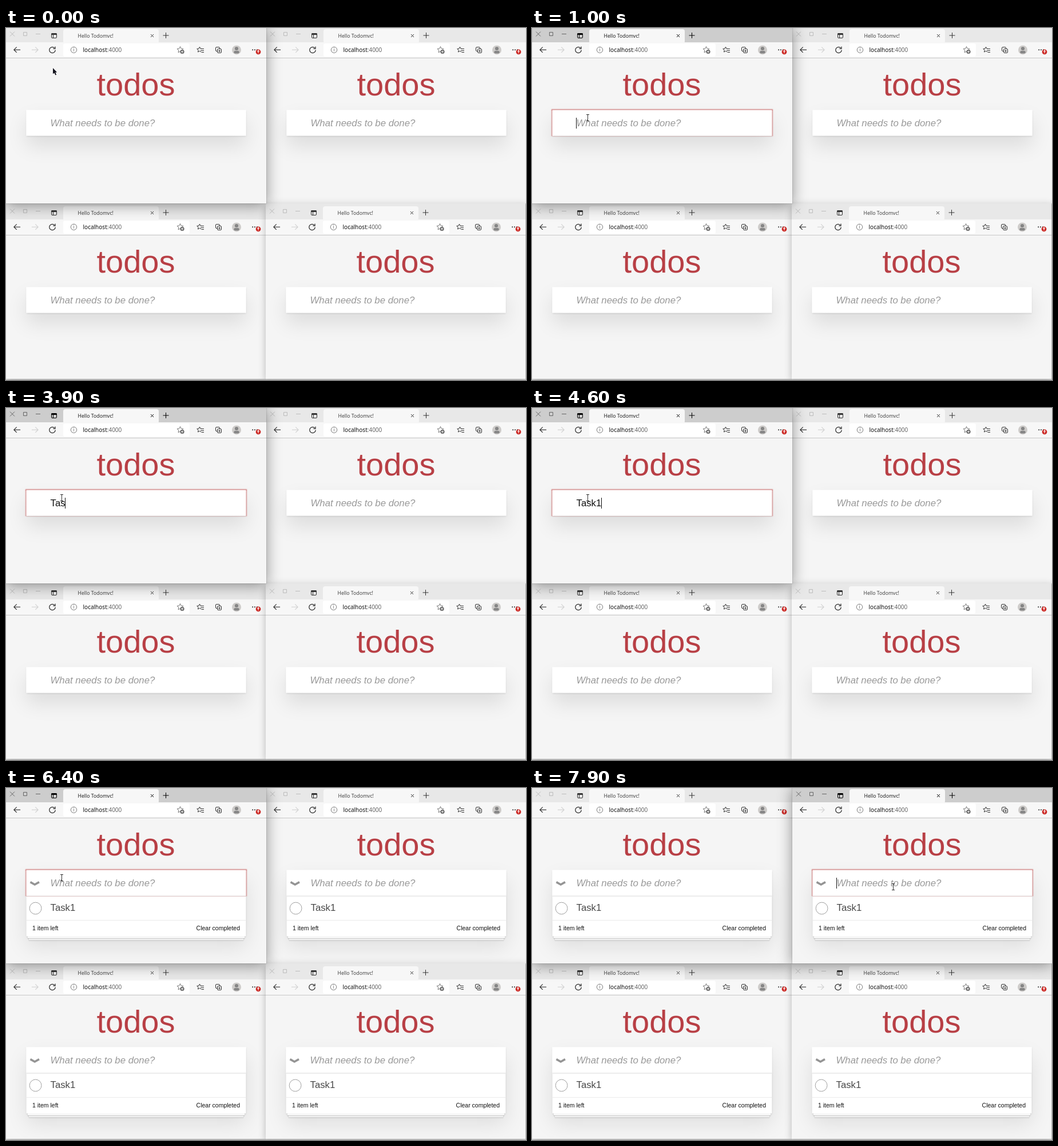
Write an HTML page with a canvas that moves like this. It is 909x616 px and loops after 8 s.

```html
<!DOCTYPE html>
<html lang="en">
<head>
<meta charset="utf-8">
<title>Todos</title>
<style>
html, body { margin: 0; width: 100%; height: 100%; overflow: hidden; background: #dcdcdc; }
canvas { display: block; width: 909px; height: 616px; }
</style>
</head>
<body>
<canvas id="stage" width="909" height="616"></canvas>
<script>
const LOOP = 8000, STEP = 100, BLINK = 600;
const FOCUS = 1000, MISSPELT = 5600, SUBMIT = 6400, SWITCH = 7900;
const WORD = 'Task1', TYPED_AT = [2800, 3800, 3900, 4500, 4600];

const ZOOM = 0.7; // page zoom: page sizes below are CSS pixels times this
const SANS = '"Liberation Sans", Arial, sans-serif';
const UI = '"Noto Sans", "Open Sans", sans-serif';
const BIG = 24 * ZOOM + 'px ' + SANS, SMALL = 15 * ZOOM + 'px ' + SANS;
const LEFT = 35.5, TOP = 143.5, WIDTH = 384, FIELD = 45.5, FULL = 116;
const TEXT_X = LEFT + 60 * ZOOM;
const ctx = document.getElementById('stage').getContext('2d');

function rect(x, y, w, h, color) {
  ctx.fillStyle = color;
  ctx.fillRect(x, y, w, h);
}

function round(x, y, w, h, r, color) {
  ctx.fillStyle = color;
  ctx.beginPath();
  ctx.roundRect(x, y, w, h, r);
  ctx.fill();
}

function frame(x, y, w, h, r, color) {
  ctx.strokeStyle = color;
  ctx.lineWidth = 1;
  ctx.beginPath();
  ctx.roundRect(x, y, w, h, r);
  ctx.stroke();
}

function disc(x, y, r, color) {
  ctx.fillStyle = color;
  ctx.beginPath();
  ctx.arc(x, y, r, 0, 7);
  ctx.fill();
}

function ring(x, y, r, color, width = 1, to = 2 * Math.PI) {
  ctx.strokeStyle = color;
  ctx.lineWidth = width;
  ctx.beginPath();
  ctx.arc(x, y, r, 0, to);
  ctx.stroke();
}

function line(color, width, ...points) {
  ctx.strokeStyle = color;
  ctx.lineWidth = width;
  ctx.beginPath();
  for (const [x, y] of points) ctx.lineTo(x, y);
  ctx.stroke();
}

function plus(x, y, r, color) {
  line(color, 1, [x - r, y], [x + r, y]);
  line(color, 1, [x, y - r], [x, y + r]);
}

function cross(x, y, r, color) {
  line(color, 1, [x - r, y - r], [x + r, y + r]);
  line(color, 1, [x + r, y - r], [x - r, y + r]);
}

// Arrow pointing right, turned by the angle
function arrow(x, y, r, angle, color, head = r * 0.85) {
  ctx.save();
  ctx.translate(x, y);
  ctx.rotate(angle);
  line(color, 1.1, [-r, 0], [r, 0]);
  line(color, 1.1, [r - head, -head], [r, 0], [r - head, head]);
  ctx.restore();
}

function star(x, y, r, color) {
  const points = Array.from({ length: 11 }, (_, i) => {
    const a = i * Math.PI / 5 - Math.PI / 2, d = i % 2 ? r * 0.48 : r;
    return [x + d * Math.cos(a), y + d * Math.sin(a)];
  });
  line(color, 1, ...points);
}

function text(str, x, y, font, color, align = 'left') {
  ctx.font = font;
  ctx.fillStyle = color;
  ctx.textAlign = align;
  ctx.fillText(str, x, y);
  return ctx.measureText(str).width;
}

// Shadow alone: the casting box stays off stage
function shadow(x, y, w, h, dy, blur, spread, color) {
  ctx.save();
  ctx.shadowColor = color;
  ctx.shadowBlur = blur;
  ctx.shadowOffsetX = 3000;
  ctx.shadowOffsetY = dy;
  rect(x - spread - 3000, y - spread, w + 2 * spread, h + 2 * spread, '#000');
  ctx.restore();
}

function titleBar(w, active) {
  const dim = active ? '#666' : '#bcbcbc', ink = active ? '#000' : '#333';
  rect(0, -3, w, 28, active ? '#cdcdcd' : '#e8e8e8');
  cross(11, 10.5, 4, dim);
  frame(30.5, 7.5, 6, 6, 0, dim);
  line(dim, 1, [52, 10.5], [60, 10.5]);
  frame(79.5, 9.5, 9, 8, 1.5, ink);
  rect(79.5, 9, 9, 3, ink);
  line(ink, 1, [82.5, 12], [82.5, 18]);
  round(100, 2, 167, 25, 4, '#f7f7f7');
  text('Hello Todomvc!', 125.5, 16.5, '8.7px ' + UI, active ? '#222' : '#444');
  cross(255.5, 13.5, 2.5, ink);
  plus(279.5, 13, 5, ink);
}

function addressBox() {
  round(100, 27, 221, 23, 3, '#fff');
  ring(118.5, 38.3, 5.2, '#777');
  text('i', 118.5, 41.3, '8px ' + UI, '#666', 'center');
  const font = '10px ' + UI, w = text('localhost', 134.5, 42, font, '#111');
  text(':4000', 134.5 + w, 42, font, '#666');
  star(304.5, 38.2, 5.8, '#777');
  disc(308, 41.5, 3.6, '#666');
  plus(308, 41.5, 2, '#fff');
}

function toolBar(w) {
  rect(0, 25, w, 27, '#f7f7f7');
  rect(0, 52, w, 1, '#c8c8c8');
  arrow(19.5, 38.2, 5.6, Math.PI, '#222');
  arrow(50.5, 38.2, 5.6, 0, '#cfcfcf');
  ring(81, 38.5, 5.2, '#222', 1.2, 5.5);
  line('#222', 1.2, [86, 32.6], [86, 36.2], [82.4, 36.2]);
  addressBox();

  star(338.5, 38, 5, '#333');
  rect(340.8, 35.5, 6, 8, '#f7f7f7');
  for (let i = 0; i < 3; i++) line('#333', 1, [340.5 + i / 2, 36.5 + 3 * i], [346, 36.5 + 3 * i]);
  frame(366.5, 33.5, 7, 7, 1.5, '#333');
  rect(369.5, 36.5, 7, 7, '#f7f7f7');
  frame(369.5, 36.5, 7, 7, 1.5, '#333');
  plus(373, 40.2, 2, '#333');

  disc(403, 38.4, 8, '#cdcbc9');
  disc(403, 36, 3.1, '#858585');
  round(398.3, 40, 9.4, 4.4, 2.4, '#858585');
  for (let i = -1; i < 2; i++) disc(435 + 3.8 * i, 38.3, 1, '#222');
  disc(441, 41.8, 4.4, '#cc2a26');
  arrow(441, 41.8, 2.4, -Math.PI / 2, '#fff', 1.6);
}

function squiggle(from, to) {
  const points = [];
  for (let x = from; x <= to; x += 0.7) points.push([x, 174.1 + 0.8 * Math.sin((x - from) * 2.2)]);
  line('#e0463c', 0.8, ...points);
}

// Two narrower sheets peeping out below the card
function sheets() {
  for (const n of [2, 1]) {
    const inset = 3 * n * ZOOM, y = TOP + FULL - 35, h = 35 + 8 * n * ZOOM - inset;
    shadow(LEFT + inset, y, WIDTH - 2 * inset, h, 0.7, 1, 0, 'rgba(0,0,0,.25)');
    rect(LEFT + inset, y, WIDTH - 2 * inset, h, '#f6f6f6');
  }
}

function list() {
  line('#949494', 3.6, [42.5, 164.6], [50.2, 169], [58, 164.6]);
  ring(51.6, 210.5, 10.4, '#949494', 0.9);
  text(WORD, TEXT_X, 215, BIG, '#484848');
  rect(LEFT, 231, WIDTH, 0.8, '#e6e6e6');
  text('1 item left', LEFT + 15 * ZOOM, 249, SMALL, '#111');
  text('Clear completed', LEFT + WIDTH - 15 * ZOOM, 249, SMALL, '#111', 'right');
}

function page(w, h, s) {
  const height = s.listed ? FULL : FIELD, bottom = TOP + FIELD;
  rect(0, 53, w, h - 53, '#f5f5f5');
  text('todos', 227, 118, 80 * ZOOM + 'px ' + SANS, '#b83f45', 'center');

  shadow(LEFT, TOP, WIDTH, height, 25 * ZOOM, 50 * ZOOM, 0, 'rgba(0,0,0,.1)');
  shadow(LEFT, TOP, WIDTH, height, 2 * ZOOM, 4 * ZOOM, 0, 'rgba(0,0,0,.2)');
  if (s.listed) sheets();
  rect(LEFT, TOP, WIDTH, height, '#fff');
  if (s.listed) rect(LEFT, bottom, WIDTH, 1, '#e6e6e6');
  if (s.focused) shadow(LEFT, TOP, WIDTH, FIELD, 0, 2 * ZOOM, 2 * ZOOM, '#cf7d7d');
  rect(LEFT, TOP, WIDTH, FIELD, '#fff');
  rect(LEFT, bottom - 1.5, WIDTH, 1.5, 'rgba(0,0,0,.04)');

  if (s.listed) list();
  if (!s.typed) text('What needs to be done?', TEXT_X, 172, 'italic ' + BIG, '#999');
  const typedW = text(s.typed, TEXT_X, 172, BIG, '#111');
  if (s.misspelt) squiggle(TEXT_X, TEXT_X + typedW);
  if (s.caret) rect(Math.floor(TEXT_X + typedW), 157, 1, 19, '#111');
}

function browser(id, s) {
  const right = id === 'B' || id === 'D', lower = id > 'B';
  const x = right ? 455 - lower : 0, y = lower ? 310 : 0;
  const w = 455 - lower / 2, h = lower ? 304.5 : 307;
  const strong = id === 'A' || s.focused;
  shadow(x, y - 3, w, h + 3, 3, strong ? 24 : 12, 0, `rgba(0,0,0,${strong ? 0.42 : 0.25})`);
  shadow(x, y - 3, w, h + 3, 0, 1, 0.4, 'rgba(0,0,0,.2)');
  ctx.save();
  ctx.beginPath();
  ctx.rect(x, y - 3, w, h + 3);
  ctx.clip();
  ctx.translate(x, y);
  titleBar(w, s.focused);
  toolBar(w);
  page(w, h, s);
  ctx.restore();
}

const mix = (a, b, p) => a + (b - a) * p;

function ease(t, from, to) {
  const p = Math.min(1, Math.max(0, (t - from) / (to - from)));
  return p * p * (3 - 2 * p);
}

function pointer(t) {
  if (t < 6600) {
    const p = ease(t, 200, 800);
    return t < 300 ? [82, 70] : [mix(82, 97, p), mix(70, 157, p)];
  }
  const p = ease(t, 6700, 7600);
  return [mix(94, 631, p), mix(151, 173, p)];
}

function drawPointer([x, y]) {
  const inField = y > TOP && Math.abs((x % 455) - 227.5) < WIDTH / 2;
  ctx.save();
  ctx.translate(Math.floor(x) + (inField ? 0.5 : 0), y);
  if (inField) {
    line('#333', 1, [0, -5], [0, 5]);
    for (const end of [-5.5, 5.5]) line('#333', 1, [-2.5, end], [2.5, end]);
  } else {
    const shape = [[0, 0], [0, 10.5], [2.3, 8.4], [4.4, 12.6], [6.2, 11.7], [4.3, 7.8], [7.2, 7.4]];
    line('rgba(255,255,255,.8)', 1.4, ...shape, shape[0]);
    ctx.fillStyle = '#14141e';
    ctx.fill();
  }
  ctx.restore();
}

function draw(t) {
  const listed = t >= SUBMIT, switched = t >= SWITCH;
  const count = TYPED_AT.filter(at => at <= t).length;
  const since = listed ? SUBMIT + BLINK : count ? TYPED_AT[count - 1] : FOCUS;
  const lit = t >= since && Math.floor((t - since) / BLINK) % 2 === 0;
  const idle = { listed, typed: '' };
  const states = {
    A: switched ? idle : {
      listed, focused: t >= FOCUS, caret: lit,
      typed: listed ? '' : WORD.slice(0, count),
      misspelt: t >= MISSPELT && !listed
    },
    B: switched ? { ...idle, focused: true, caret: true } : idle
  };
  rect(0, 0, 909, 616, '#e4e4e4');
  for (const id of switched ? 'CDAB' : 'BCDA') browser(id, states[id] || idle);
  drawPointer(pointer(t));
}

let last = -1;
const start = performance.now();
function tick() {
  const t = Math.floor((performance.now() - start) % LOOP / STEP) * STEP;
  if (t !== last) draw(last = t);
  requestAnimationFrame(tick);
}
tick();
</script>
</body>
</html>
```
